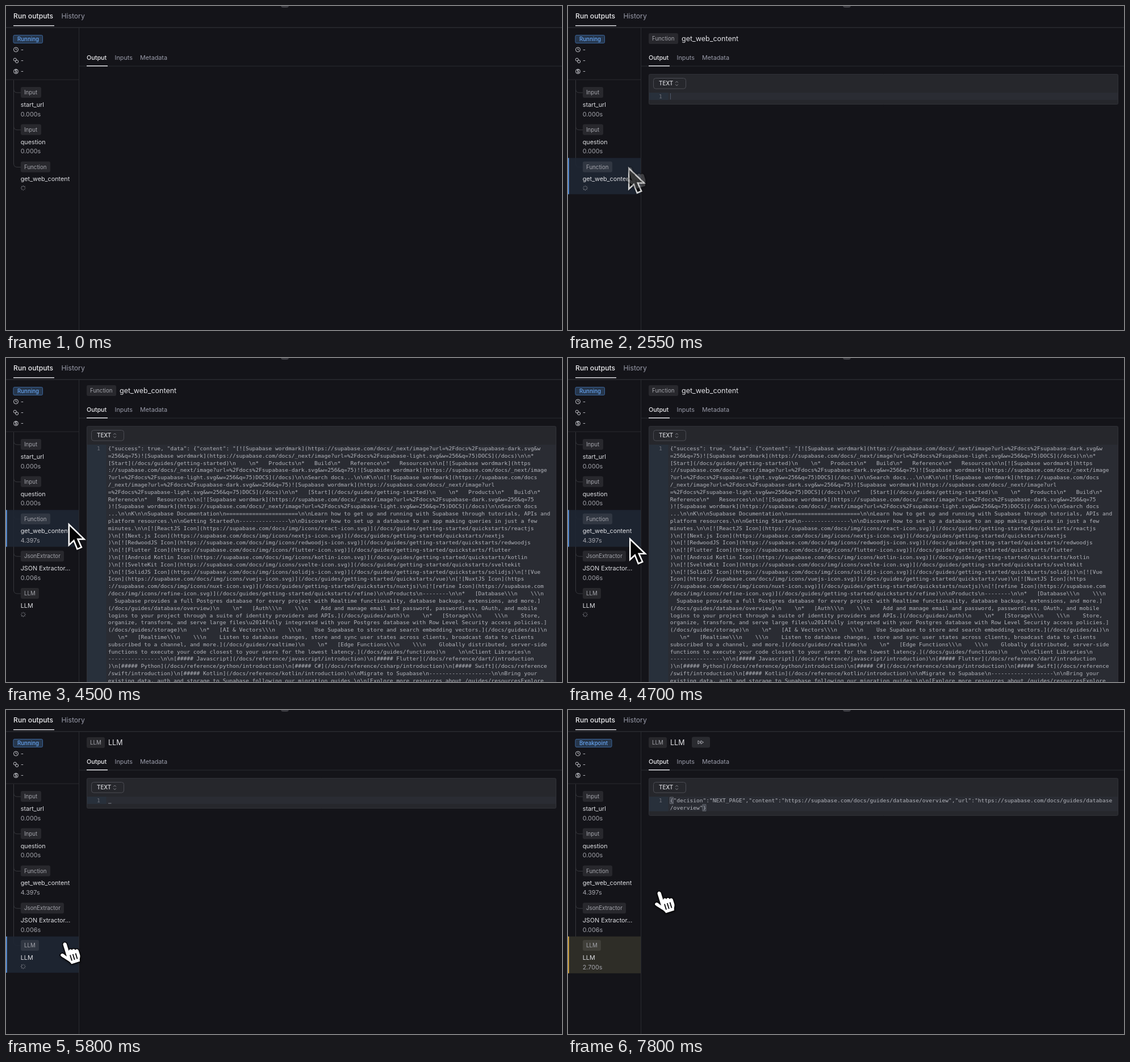
An HTML page with a canvas for the animation above (8000 ms loop, 979 px wide and 572 px high).

```html
<!DOCTYPE html>
<html lang="en">
<head>
<meta charset="utf-8">
<title>Run outputs</title>
<style>
html, body { margin: 0; width: 100%; height: 100%; overflow: hidden; background: #141419; }
canvas { display: block; width: 979px; height: 572px; }
</style>
</head>
<body>
<canvas id="stage" width="979" height="572"></canvas>
<script>
const ctx = document.getElementById('stage').getContext('2d');
const LOOP = 8000;
const OPEN_FN = 1500, FN_DONE = 4450, OPEN_LLM = 5750, STREAM = 5850, LLM_DONE = 7150;
const UI = 'Inter, "Open Sans", sans-serif';
const MONO = '9.585px "DejaVu Sans Mono", "Liberation Mono", monospace';
const LINE = 12.81, ROW = 65.75;

const page = String.raw`{"success": true, "data": {"content": "[![Supabase wordmark](https://supabase.com/docs/_next/image?url=%2Fdocs%2Fsupabase-dark.svg&w
=256&q=75)![Supabase wordmark](https://supabase.com/docs/_next/image?url=%2Fdocs%2Fsupabase-light.svg&w=256&q=75)DOCS](/docs)\n\n*
[Start](/docs/guides/getting-started)\n    \n*   Products\n*   Build\n*   Reference\n*   Resources\n\n[![Supabase wordmark](https
://supabase.com/docs/_next/image?url=%2Fdocs%2Fsupabase-dark.svg&w=256&q=75)![Supabase wordmark](https://supabase.com/docs/_next/image
?url=%2Fdocs%2Fsupabase-light.svg&w=256&q=75)DOCS](/docs)\n\nSearch docs...\n\nK\n\n[![Supabase wordmark](https://supabase.com/docs
/_next/image?url=%2Fdocs%2Fsupabase-dark.svg&w=256&q=75)![Supabase wordmark](https://supabase.com/docs/_next/image?url
=%2Fdocs%2Fsupabase-light.svg&w=256&q=75)DOCS](/docs)\n\n*   [Start](/docs/guides/getting-started)\n    \n*   Products\n*   Build\n*
Reference\n*   Resources\n\n[![Supabase wordmark](https://supabase.com/docs/_next/image?url=%2Fdocs%2Fsupabase-dark.svg&w=256&q=75
)![Supabase wordmark](https://supabase.com/docs/_next/image?url=%2Fdocs%2Fsupabase-light.svg&w=256&q=75)DOCS](/docs)\n\nSearch docs
...\n\nK\n\nSupabase Documentation\n======================\n\nLearn how to get up and running with Supabase through tutorials, APIs and
platform resources.\n\nGetting Started\n---------------\n\nDiscover how to set up a database to an app making queries in just a few
minutes.\n\n[![ReactJS Icon](https://supabase.com/docs/img/icons/react-icon.svg)](/docs/guides/getting-started/quickstarts/reactjs
)\n[![Next.js Icon](https://supabase.com/docs/img/icons/nextjs-icon.svg)](/docs/guides/getting-started/quickstarts/nextjs
)\n[![RedwoodJS Icon](https://supabase.com/docs/img/icons/redwoodjs-icon.svg)](/docs/guides/getting-started/quickstarts/redwoodjs
)\n[![Flutter Icon](https://supabase.com/docs/img/icons/flutter-icon.svg)](/docs/guides/getting-started/quickstarts/flutter
)\n[![Android Kotlin Icon](https://supabase.com/docs/img/icons/kotlin-icon.svg)](/docs/guides/getting-started/quickstarts/kotlin
)\n[![SvelteKit Icon](https://supabase.com/docs/img/icons/svelte-icon.svg)](/docs/guides/getting-started/quickstarts/sveltekit
)\n[![SolidJS Icon](https://supabase.com/docs/img/icons/solidjs-icon.svg)](/docs/guides/getting-started/quickstarts/solidjs)\n[![Vue
Icon](https://supabase.com/docs/img/icons/vuejs-icon.svg)](/docs/guides/getting-started/quickstarts/vue)\n[![NuxtJS Icon](https
://supabase.com/docs/img/icons/nuxt-icon.svg)](/docs/guides/getting-started/quickstarts/nuxtjs)\n[![refine Icon](https://supabase.com
/docs/img/icons/refine-icon.svg)](/docs/guides/getting-started/quickstarts/refine)\n\nProducts\n--------\n\n*   [Database\\\n    \\\n
  Supabase provides a full Postgres database for every project with Realtime functionality, database backups, extensions, and more.]
(/docs/guides/database/overview)\n    \n*   [Auth\\\n    \\\n    Add and manage email and password, passwordless, OAuth, and mobile
logins to your project through a suite of identity providers and APIs.](/docs/guides/auth)\n    \n*   [Storage\\\n    \\\n    Store,
organize, transform, and serve large files\u2014fully integrated with your Postgres database with Row Level Security access policies.]
(/docs/guides/storage)\n    \n*   [AI & Vectors\\\n    \\\n    Use Supabase to store and search embedding vectors.](/docs/guides/ai)\n
   \n*   [Realtime\\\n    \\\n    Listen to database changes, store and sync user states across clients, broadcast data to clients
subscribed to a channel, and more.](/docs/guides/realtime)\n    \n*   [Edge Functions\\\n    \\\n    Globally distributed, server-side
functions to execute your code closest to your users for the lowest latency.](/docs/guides/functions)\n    \n\nClient Libraries\n
----------------\n\n[##### Javascript](/docs/reference/javascript/introduction)\n[##### Flutter](/docs/reference/dart/introduction
)\n[##### Python](/docs/reference/python/introduction)\n[##### C#](/docs/reference/csharp/introduction)\n[##### Swift](/docs/reference
/swift/introduction)\n[##### Kotlin](/docs/reference/kotlin/introduction)\n\nMigrate to Supabase\n-------------------\n\nBring your
existing data, auth and storage to Supabase following our migration guides.\n\n[Explore more resources about /guides/resourcesExplore`.split('\n');

const LINK = 'https://supabase.com/docs/guides/database/overview';
const reply = `{\n  "decision": "NEXT_PAGE",\n  "url": "${LINK}",\n  "content": "${LINK}"\n}`;
const PER_TICK = (reply.indexOf('content') + 7) / 11;
const packed = [
  `{"decision":"NEXT_PAGE","content":"${LINK}","url":"${LINK.replace('/overview', '')}`,
  '/overview"}'
];

// Pointer path: time, x, y
const path = [
  [900, 250, 190], [1350, 105, 296], [1900, 105, 296], [2550, 106, 284],
  [3500, 112, 255], [4250, 112, 255], [4700, 108, 317], [5000, 106, 340],
  [5400, 100, 410], [5900, 100, 410], [6400, 146, 342], [6900, 157, 320]
];

const clamp = v => Math.max(0, Math.min(1, v));
const ramp = (t, a, b) => clamp((t - a) / (b - a));
const ease = v => v * v * (3 - 2 * v);

function text(s, x, y, size, color, weight = 400) {
  ctx.font = `${weight} ${size}px ${UI}`;
  ctx.fillStyle = color;
  ctx.fillText(s, x, y);
}

function rect(x, y, w, h, color) {
  ctx.fillStyle = color;
  ctx.fillRect(x, y, w, h);
}

function box(x, y, w, h, r, fill, stroke) {
  ctx.beginPath();
  ctx.roundRect(x, y, w, h, r);
  if (fill) { ctx.fillStyle = fill; ctx.fill(); }
  if (stroke) { ctx.strokeStyle = stroke; ctx.lineWidth = 1; ctx.stroke(); }
}

function line(points, color, width = 1) {
  ctx.beginPath();
  points.forEach(([x, y]) => ctx.lineTo(x, y));
  ctx.strokeStyle = color;
  ctx.lineWidth = width;
  ctx.stroke();
}

function ring(x, y, r, color) {
  ctx.beginPath();
  ctx.arc(x, y, r, 0, 7);
  ctx.strokeStyle = color;
  ctx.lineWidth = 1;
  ctx.stroke();
}

function badge(s, x, y, w) {
  box(x, y - 9.5, w, 19, 3, 'rgba(255,255,255,.085)');
  text(s, x + 6, y + 3.5, 9.7, '#a2a3aa');
}

function spinner(x, y, t) {
  ctx.save();
  ctx.translate(x, y);
  for (let i = 0; i < 8; i++) {
    ctx.rotate(Math.PI / 4);
    ctx.globalAlpha = 0.5 + 0.5 * (((i / 8 - t / 1000) % 1 + 1) % 1);
    line([[0, -2.4], [0, -4.4]], '#909198', 1.2);
  }
  ctx.restore();
}

function header() {
  box(484, -6, 14, 9, 4, '#3b3b41');
  text('Run outputs', 13, 22.3, 12.2, '#ececef', 500);
  text('History', 97.5, 22.3, 12.2, '#9a9caa');
  rect(0, 37.3, 979, 1.4, '#2c2d32');
  rect(13, 34, 72, 1.4, '#e4e4e8');
}

function status(t) {
  const paused = t >= LLM_DONE;
  box(13, 51.5, paused ? 64 : 51.5, 14, 2, '#26364b', '#3a649a');
  text(paused ? 'Breakpoint' : 'Running', 20, 61.9, 9.7, '#65a2ee', 500);
  const c = '#c9cad0';
  ring(17.5, 77, 4, c);
  line([[17.5, 74.5], [17.5, 77], [19.3, 78]], c);
  ring(15.8, 94.6, 2.5, c);
  ring(19.2, 98, 2.5, c);
  ring(17.5, 115.5, 4, c);
  text('$', 15.2, 118.3, 7.5, c, 600);
  [80.6, 99.8, 119].forEach(y => text('-', 26, y, 10.8, c));
}

function sidebar(t) {
  const done = t >= FN_DONE, paused = t >= LLM_DONE;
  const steps = [
    ['Input', 36, 'start_url', '0.000s'],
    ['Input', 36, 'question', '0.000s'],
    ['Function', 52, 'get_web_content', done && '4.397s']
  ];
  if (done) steps.push(
    ['JsonExtractor', 76, 'JSON Extractor...', '0.006s'],
    ['LLM', 32, 'LLM', paused && '2.700s']
  );
  const last = steps.length - 1;
  const endY = 152.5 + last * ROW;
  line([[13.5, 131], [13.5, endY - 5]], '#37383d');
  steps.forEach((s, i) => {
    const y = 152.5 + i * ROW;
    ctx.beginPath();
    ctx.moveTo(13.5, y - 6);
    ctx.quadraticCurveTo(13.5, y + 0.5, 20, y + 0.5);
    ctx.lineTo(26, y + 0.5);
    ctx.stroke();
  });

  const picked = t >= OPEN_LLM ? 4 : t >= OPEN_FN ? 2 : -1;
  if (picked > 0) {
    const y = 268.3 + (picked - 2) * ROW;
    const h = steps[picked][3] ? 65 : 64;
    const amber = picked === 4 && paused;
    ctx.globalAlpha = amber ? 1 : 0.9;
    rect(0, y, 128, h, amber ? '#2e2d27' : '#1e2633');
    ctx.globalAlpha = 1;
    rect(0, y, 1.7, h, amber ? '#dfad43' : '#5c97e6');
  }

  steps.forEach(([kind, w, name, time], i) => {
    const y = 152.5 + i * ROW;
    badge(kind, 26, y, w);
    text(name, 25.7, y + 25.3, 10.8, '#dedfe3');
    if (time) text(time, 25.7, y + 42, 10.8, '#a4a5ac');
    else spinner(30.3, y + 37.3, t);
  });
  rect(0, 129.5, 128, 1, '#2a2b30');
  rect(128, 38, 1, 534, '#2a2b30');
}

function tabs() {
  text('Output', 142, 95.2, 10.8, '#ececef', 500);
  text('Inputs', 191.5, 95.2, 10.8, '#9a9caa');
  text('Metadata', 236, 95.2, 10.8, '#9a9caa');
  rect(129, 105.6, 850, 1, '#2a2b30');
  rect(142, 105, 37, 1.5, '#e4e4e8');
}

function code(lines, numbered) {
  const h = 41.2 + lines.length * LINE;
  box(142.5, 120.5, 826, h - 1, 2, '#26272c', '#303137');
  const active = numbered ? LINE : lines.length * LINE;
  rect(143, 153, 825, active, '#2a2c33');
  rect(143, 153, 33.5, active, '#28303b');
  box(150.5, 127.5, 57, 18.5, 4, '#26272c', '#4b4c53');
  text('TEXT', 160, 140.3, 9.8, '#dcdde1', 500);
  line([[189.2, 135.4], [191.5, 133], [193.8, 135.4]], '#8b8c93');
  line([[189.2, 138.4], [191.5, 140.8], [193.8, 138.4]], '#8b8c93');
  ctx.font = MONO;
  lines.forEach((s, i) => {
    const y = 162.9 + i * LINE;
    if (numbered || !i) {
      ctx.fillStyle = '#70737c';
      ctx.fillText(i + 1, 160, y);
    }
    ctx.fillStyle = '#b4b6bd';
    ctx.fillText(s, 179.8, y);
  });
}

function bracket(x, y) {
  box(x - 0.3, y, 6, 11.5, 0, 'rgba(160,170,185,.16)', '#62666f');
}

function detail(t) {
  tabs();
  if (t < OPEN_FN) return;
  if (t < OPEN_LLM) {
    badge('Function', 142, 57.5, 52);
    text('get_web_content', 200, 62, 12.5, '#e2e2e6');
    const ready = t >= FN_DONE;
    code(ready ? page : [''], false);
    if (!ready) rect(180, 154, 1, 11, '#4d586a');
    else if (t > 5200) bracket(179.8, 154);
    return;
  }
  badge('LLM', 142, 57.5, 32);
  text('LLM', 180, 62, 12.5, '#e2e2e6');
  if (t < LLM_DONE) {
    const ticks = Math.max(0, Math.floor((t - STREAM) / 50));
    code(reply.slice(0, Math.round(ticks * PER_TICK)).split('\n'), true);
    rect(180, 164.3, 5.5, 1, '#7c8089');
    return;
  }
  box(218, 47.5, 32, 19, 3, '#2a2b30');
  ctx.lineJoin = 'round';
  [229, 234].forEach(x => line([[x, 54], [x + 4.5, 57], [x, 60], [x, 54]], '#a9aab1'));
  code(packed, false);
  bracket(179.8, 154);
  bracket(237.2, 166.8);
}

function arrow() {
  ctx.beginPath();
  [[1.2, 2.5], [1.2, 39], [9.8, 31], [15.8, 46], [23.2, 42.8], [16.8, 28.5], [28, 28.5]]
    .forEach(([x, y]) => ctx.lineTo(x, y));
  ctx.closePath();
  ctx.lineJoin = 'miter';
  ctx.fillStyle = '#050506';
  ctx.fill();
  ctx.strokeStyle = '#fff';
  ctx.lineWidth = 2.6;
  ctx.stroke();
}

function hand() {
  const shape = new Path2D('M-3 4C-3 -1 3.3 -1 3.3 4V17C4 13.5 9 13.5 9 17.5C10 14.5 14.5 15 14.5 19' +
    'C15.5 17 20 17 20 21.5V29C20 33 17 35 16.5 40H1C.5 35 -8 28 -12 22C-15 18 -9 16 -7 19L-3 25Z');
  ctx.translate(2.5, 0.5);
  ctx.rotate(-0.3);
  ctx.lineJoin = 'round';
  ctx.strokeStyle = '#08080a';
  ctx.lineWidth = 3;
  ctx.stroke(shape);
  ctx.fillStyle = '#fff';
  ctx.fill(shape);
  ctx.shadowColor = 'transparent';
  [3.5, 8.5, 13.5].forEach(x => line([[x, 24], [x, 34.5]], '#08080a', 1.8));
}

function pointer(t) {
  if (t < path[0][0]) return;
  let i = path.findIndex(p => p[0] > t);
  if (i < 0) i = path.length;
  const a = path[i - 1], b = path[i] || a;
  const k = ease(ramp(t, a[0], b[0] + (a === b)));
  const handed = ramp(t, 1200, 1350) - ramp(t, 2430, 2580) + ramp(t, 5050, 5200);
  const shown = ramp(t, 900, 1050);
  ctx.save();
  ctx.translate(a[1] + (b[1] - a[1]) * k, a[2] + (b[2] - a[2]) * k);
  ctx.shadowColor = 'rgba(0,0,0,.4)';
  ctx.shadowBlur = 3;
  ctx.shadowOffsetY = 1;
  if (handed < 1) { ctx.globalAlpha = shown * (1 - handed); arrow(); }
  if (handed > 0) { ctx.globalAlpha = shown * handed; hand(); }
  ctx.restore();
}

function draw(now) {
  const t = now % LOOP;
  rect(0, 0, 979, 572, '#141419');
  header();
  status(t);
  sidebar(t);
  detail(t);
  pointer(t);
  requestAnimationFrame(draw);
}
requestAnimationFrame(draw);
</script>
</body>
</html>
```
